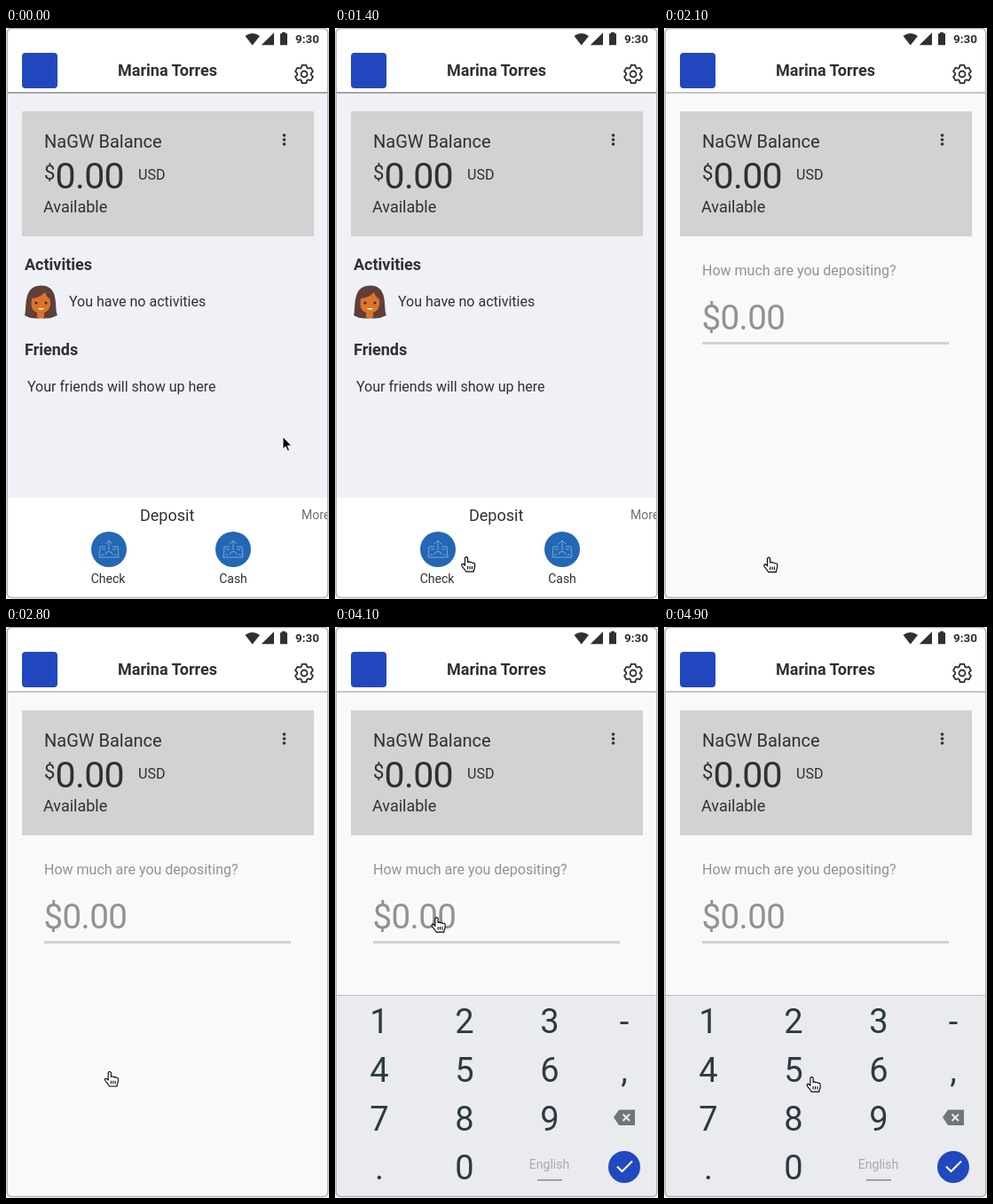
These frames come from a looping animation (364 px wide and 644 px high, 5 s). An HTML page:

```html
<!DOCTYPE html>
<html lang="en">
<head>
<meta charset="utf-8">
<title>Deposit prototype</title>
<style>
  html, body { margin: 0; width: 100%; height: 100%; overflow: hidden; background: #fff; }
  svg { display: block; width: 364px; height: 644px; font-family: Roboto, sans-serif; font-size: 16px; fill: #303030; }
  .b { font-weight: 700; }
  .m { text-anchor: middle; }
  .s { font-size: 14px; }
  .l { font-size: 18px; }
  .sum { letter-spacing: -.6px; }
  .line { fill: none; stroke: #303030; stroke-width: 1.8; stroke-linejoin: round; }
  #keys { font-size: 38px; fill: #2d3a42; text-anchor: middle; }
</style>
</head>
<body>
<svg viewBox="0 0 364 644">
  <defs>
    <g id="bill">
      <circle r="20" fill="#2467b4"/>
      <path d="M-4-3H-10L-11 9H11L10-3H4M-8 0H-4M4 0H8M-9 6H-6M6 6H9M-4 6A4 3.5 0 0 1 4 6M0 1V-10M-4-6L0-10 4-6" fill="none" stroke="#8abbe0" stroke-width=".8"/>
    </g>
  </defs>

  <rect id="page" x="2" y="73" width="360" height="569"/>

  <!-- header -->
  <path d="M269.500 9Q277.500 3 286 9L277.700 19.500ZM288 19V19.200H302V5.200ZM309 6.200H311V4.700H315V6.200H317V19.200H309Z"/>
  <text class="b" x="326" y="17" font-size="13.5">9:30</text>
  <rect x="18" y="28" width="40" height="40" rx="4" fill="#2148be"/>
  <text class="b m l" x="182" y="54">Marina Torres</text>
  <g transform="translate(336 52)" class="line"><path id="gear"/><circle r="3.500"/></g>
  <rect id="rule" x="2" y="72" width="360" height="2"/>

  <!-- balance card -->
  <rect x="18" y="94" width="329" height="141" fill="#d2d2d2"/>
  <text x="43" y="135" font-size="20">NaGW Balance</text>
  <circle cx="313.500" cy="121" r="1.8"/><circle cx="313.500" cy="126" r="1.8"/><circle cx="313.500" cy="131" r="1.8"/>
  <text x="43" y="171" font-size="22">$</text>
  <text class="sum" x="55.500" y="180.500" font-size="41">0.00</text>
  <text x="149" y="171">USD</text>
  <text x="42" y="208" class="l">Available</text>

  <g id="home">
    <text class="b l" x="21" y="273">Activities</text>
    <path d="M21 324C24 318 18 291 39 290.500C61 290 54 316 58 324Q49 329 39.500 327Q29 329 21 324Z" fill="#5f4038"/>
    <path d="M29 305Q37 305 44 298Q46 304 50 306V312Q49 319 43 321V326Q39 329 35 326V321Q29 319 28.500 312Z" fill="#dd742b"/>
    <circle cx="34" cy="310" r="1.500"/><circle cx="45" cy="310" r="1.500"/>
    <path d="M35.500 316Q39.500 319.500 43.500 316Z" fill="#fff"/>
    <text x="71" y="314">You have no activities</text>
    <text class="b l" x="21" y="369">Friends</text>
    <text x="24" y="410">Your friends will show up here</text>
    <rect x="2" y="530" width="360" height="112" fill="#fff"/>
    <text class="l" x="151" y="556">Deposit</text>
    <text class="s" x="333" y="554" fill="#707070">More</text>
    <use href="#bill" x="116" y="588"/>
    <use href="#bill" x="256" y="588"/>
    <text class="s m" x="115" y="626">Check</text>
    <text class="s m" x="256" y="626">Cash</text>
  </g>

  <g id="deposit">
    <g fill="#929292">
      <text x="43" y="279">How much are you depositing?</text>
      <text class="sum" x="42.500" y="340" font-size="38.5">$0.00</text>
    </g>
    <rect x="43" y="354" width="278" height="3" fill="#d2d2d2"/>
  </g>

  <g id="pad">
    <rect x="2" y="415" width="360" height="227" fill="#e9ebef"/>
    <rect x="2" y="415" width="360" height="1" fill="#b9bbbf"/>
    <g id="keys"></g>
    <path d="M314 553L320 544.500H338V562H320Z" fill="#6f7679"/>
    <path d="M324.500 549.500L332 557M332 549.500L324.500 557" stroke="#e9ebef" stroke-width="2"/>
    <text class="s m" x="241.500" y="611" fill="#a6a9ad">English</text>
    <rect x="228" y="623" width="28" height="1.500" fill="#858a8e"/>
    <circle cx="326" cy="609" r="18" fill="#2148be"/>
    <path d="M318 608.500L323.500 614 335 602.500" fill="none" stroke="#fff" stroke-width="2"/>
  </g>

  <path d="M0 0H364V644H0ZM2 1V638Q2 642 6 642H358Q362 642 362 638V1Z" fill="#fff" fill-rule="evenodd"/>
  <rect x="1.200" y=".5" width="361.600" height="642" rx="5" fill="none" stroke="#b2b2b2" stroke-width="1.600"/>

  <g id="cursor">
    <path id="arrow" d="M0 0V14L3.200 11 5.400 16.200 7.600 15.300 5.400 10.200H9.800Z" fill="#000" stroke="#fff"/>
    <g id="hand" stroke="#000" stroke-width="1.100" stroke-linejoin="round" transform="translate(.5 -.5)">
      <path d="M-1.600 1.200Q0-1 1.600 1.200V6Q3.200 4.600 4.400 6.400Q6 5.400 7 7Q9 6 9.600 8.200V11Q9.600 13 8.400 14.600V16.600H-.4Q-1.800 14-4 11.600Q-6.400 8.600-4.600 7.900Q-3 7.600-1.600 9.800Z" fill="#fff"/>
      <path d="M1.600 10.500V14M4 10.500V14M6.400 10.500V14"/>
    </g>
  </g>
</svg>
<script>
const $ = id => document.getElementById(id);
const show = (id, on) => $(id).setAttribute('visibility', on ? 'visible' : 'hidden');

// Six-toothed gear outline: radius, then angle offset within each tooth
const tooth = [[7.800, -25], [10.400, -13], [10.400, 13], [7.800, 25]];
const outline = [];
for (let k = 0; k < 6; k++)
  for (const [r, off] of tooth) {
    const a = (k * 60 - 90 + off) * Math.PI / 180;
    outline.push((r * Math.cos(a)).toFixed(2) + ' ' + (r * Math.sin(a)).toFixed(2));
  }
$('gear').setAttribute('d', 'M' + outline.join('L') + 'Z');

const columns = [50, 146, 242, 326];
$('keys').innerHTML = ['123-', '456,', '789', '.0'].map((row, r) =>
  [...row].map((key, c) => `<text x="${columns[c]}" y="${458 + r * 55}">${key}</text>`).join('')).join('');

// Pointer tip: time, x, y
const stops = [
  [900, 312, 461], [1400, 147.500, 597], [1600, 117.500, 597.500],
  [2600, 117.500, 597.500], [3100, 114, 328],
  [4400, 114, 328], [4900, 166, 508]
];

function tip(t) {
  const i = stops.findIndex(s => s[0] > t);
  if (i === 0) return stops[0].slice(1);
  if (i < 0) return stops.at(-1).slice(1);
  const [a, b] = [stops[i - 1], stops[i]];
  const p = (t - a[0]) / (b[0] - a[0]);
  const e = p * p * (3 - 2 * p);
  return [a[1] + (b[1] - a[1]) * e, a[2] + (b[2] - a[2]) * e];
}

function draw(now) {
  const t = now % 5000, home = t < 2000;
  show('home', home);
  show('deposit', !home);
  show('pad', t >= 3700);
  $('page').setAttribute('fill', home ? '#f0f1f7' : '#f9f9f9');
  $('rule').setAttribute('fill', home ? '#a5a5a8' : '#c6c6c6');
  show('arrow', t < 1350);
  show('hand', t >= 1350);
  $('cursor').setAttribute('transform', `translate(${tip(t)})`);
}

const start = performance.now();
function tick() {
  draw(performance.now() - start);
  requestAnimationFrame(tick);
}
tick();
</script>
</body>
</html>
```
